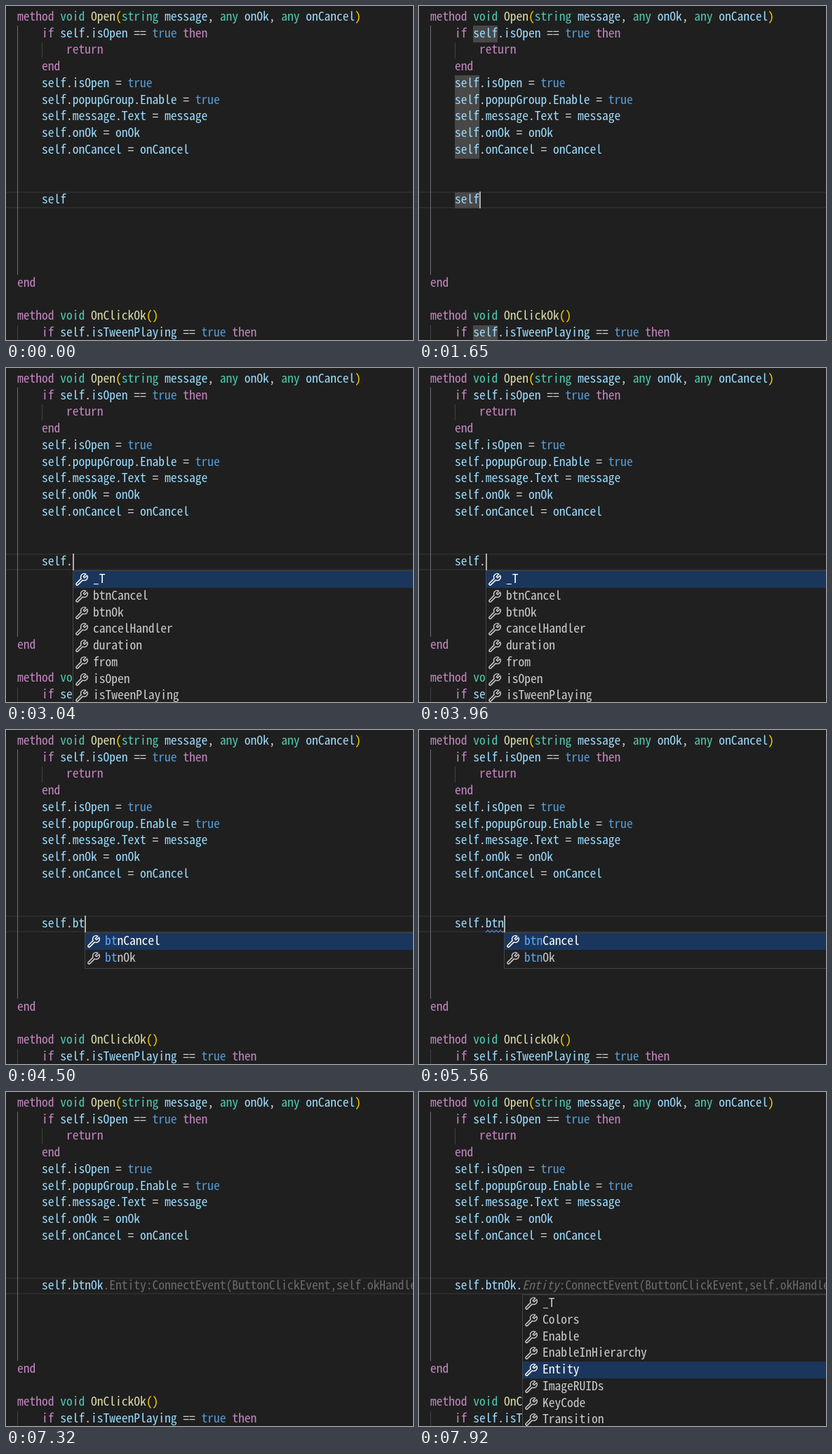
Recreate the animation shown at these times as an HTML page. Size 580 by 477 pixels, loop 8 s.

```html
<!DOCTYPE html>
<html lang="en">
<head>
<meta charset="utf-8">
<title>Editor completion</title>
<style>
  :root { --row: 23.75px; }
  html, body { margin: 0; width: 100%; height: 100%; overflow: hidden; background: #1f1f1f; }
  #stage {
    position: absolute; left: 0; top: 0; width: 580px; height: 477px; overflow: hidden;
    font: 17.5px/var(--row) "Noto Sans Mono CJK KR", "Noto Sans Mono CJK JP", "Noto Sans Mono CJK SC", monospace;
    color: #ccc; white-space: pre; background: #1f1f1f;
    font-variant-ligatures: none;
  }
  #stage div, #stage svg { position: absolute; box-sizing: border-box; }
  .line { left: 16px; margin-top: -2.4px; }
  .line i, .menu i { font-style: normal; }
  .key { color: #c586c0; }
  .type { color: #4ec9b0; }
  .fn { color: #dcdcaa; }
  .par { color: #ffd700; }
  .bool { color: #569cd6; }
  .var { color: #9cdcfe; }
  .op { color: #d4d4d4; }
  .ghost { color: #6b6b6b; }
  .ghost em { font-style: italic; }
  .guide { width: 1px; background: #404040; }
  .guide.active { background: #707070; }
  .current { left: 0; width: 580px; height: 24px; top: 265px; border: solid #2b2b2b; border-width: 2px 0; }
  .mark { width: 35px; height: var(--row); background: #484848; }
  #caret { top: 265px; width: 2px; height: 24px; background: #aeafad; }
  #wave { left: 95px; top: 285px; fill: none; stroke: #4a90f0; stroke-width: 1.2; }
  .menu { top: 289px; width: 540px; background: #202020; border: 1px solid #454545; }
  .item { left: 0; width: 100%; height: var(--row); }
  .item span { position: absolute; left: 28px; top: -1.9px; }
  .item svg { left: 2px; top: 2px; fill: none; stroke: #ccc; stroke-width: 1.15; stroke-linejoin: round; }
  .item.on { background: #1b365d; color: #fff; }
  .item.on svg { stroke: #fff; }
  .item i { color: #5aa6f8; }
</style>
</head>
<body>
<div id="stage"></div>
<script>
const LOOP = 8000, ROW = 23.75, CH = 8.75, TOP = 4.25, LEFT = 16, TYPE_ROW = 11;
const rowY = n => TOP + n * ROW;
const colX = n => LEFT + n * CH;

const code = `method void Open(string message, any onOk, any onCancel)
    if self.isOpen == true then
        return
    end
    self.isOpen = true
    self.popupGroup.Enable = true
    self.message.Text = message
    self.onOk = onOk
    self.onCancel = onCancel







end

method void OnClickOk()
    if self.isTweenPlaying == true then`.split("\n");

const menus = {
  fields: ["_T", "btnCancel", "btnOk", "cancelHandler", "duration", "from", "isOpen", "isTweenPlaying"],
  buttons: ["btnCancel", "btnOk"],
  members: ["_T", "Colors", "Enable", "EnableInHierarchy", "Entity", "ImageRUIDs", "KeyCode", "Transition"]
};

// Each track lists [start time, value].
const call = ":ConnectEvent(ButtonClickEvent,self.okHandler)";
const typed = [[0, ""], [2040, "."], [4270, ".b"], [4500, ".bt"], [4570, ".btn"], [6780, ".btnOk"], [7390, ".btnOk."]];
const ghost = [[0, ""], [6090, "<em>Ok</em>.Entity" + call], [6780, ".Entity" + call], [7390, "<em>Entity</em>" + call]];
const menu = [[0, ""], [2040, "fields"], [4270, "buttons"], [6780, ""], [7460, "members"]];
const picked = [[0, 0], [6090, 1], [7460, 4]];
const marks = [[0, false], [650, true], [2040, false]];
const wave = [[0, false], [4640, true], [6780, false]];
const blinks = [650, 1110, 1650, 2500, 3040, 3500, 3960, 5100, 5560, 6020, 6550, 7320, 7390, 7920];

const at = (track, t) => track.filter(([start]) => start <= t).pop()[1];

const kinds = [
  ["key", /^(method|if|then|return|end)$/],
  ["type", /^(void|string|any)$/],
  ["fn", /^(Open|OnClickOk)$/],
  ["bool", /^true$/],
  ["par", /^[()]$/],
  ["var", /^\w+$/],
  ["op", /./]
];
const paint = text => text.replace(/\w+|[()]|[^\w\s()]+/g, w =>
  `<i class="${kinds.find(([, re]) => re.test(w))[0]}">${w}</i>`);

const box = (cls, x, y, h = ROW) =>
  `<div class="${cls}" style="left:${x}px;top:${y}px;height:${h}px"></div>`;
const line = (html, row) => `<div class="line" style="top:${rowY(row)}px">${html}</div>`;

const wrench = `<svg width="20" height="20" viewBox="0 0 16 16"><path d="M12.6 1.9A3.8 3.8 0 0 0 7.3 6.9L1.9 12.4A1.2 1.2 0 0 0 3.6 14.1L9.1 8.7A3.8 3.8 0 0 0 14.1 3.4L11.2 6.2 9.8 4.8Z"/></svg>`;
const squiggle = `<svg id="wave" width="27" height="5"><path d="M0 4${"l3-3 3 3".repeat(5)}"/></svg>`;

function menuHtml(name, sel, x, prefix) {
  const rows = menus[name].map((label, i) => {
    const text = label.startsWith(prefix) ? `<i>${prefix}</i>${label.slice(prefix.length)}` : label;
    return `<div class="item${i === sel ? " on" : ""}" style="top:${i * ROW}px">${wrench}<span>${text}</span></div>`;
  });
  const height = menus[name].length * ROW + 4.5;
  return `<div class="menu" style="left:${x}px;height:${height}px">${rows.join("")}</div>`;
}

const selfSpots = [[1, 7], [4, 4], [5, 4], [6, 4], [7, 4], [8, 4], [11, 4], [19, 7]];
const markHtml = selfSpots.map(([row, col]) => box("mark", colX(col), rowY(row))).join("");
const backHtml = `<div class="current"></div>`;
const codeHtml = box("guide active", 16, 28, 356) + box("guide", 51, 51.5) + box("guide", 16, 455.5)
  + code.map((text, i) => line(paint(text), i)).join("");

function scene(t) {
  const tail = at(typed, t), name = at(menu, t);
  const x = colX(8 + tail.length);
  const lit = blinks.filter(b => b <= t).length % 2;
  return backHtml + (at(marks, t) ? markHtml : "") + codeHtml
    + line(`    ${paint("self" + tail)}<span class="ghost">${at(ghost, t)}</span>`, TYPE_ROW)
    + (at(wave, t) ? squiggle : "")
    + (name ? menuHtml(name, at(picked, t), Math.round(x), tail.slice(1)) : "")
    + (lit ? `<div id="caret" style="left:${Math.round(x)}px"></div>` : "");
}

const stage = document.getElementById("stage");
let shown = "";
function frame() {
  const html = scene(performance.now() % LOOP);
  if (html !== shown) stage.innerHTML = shown = html;
  requestAnimationFrame(frame);
}
frame();
</script>
</body>
</html>
```
